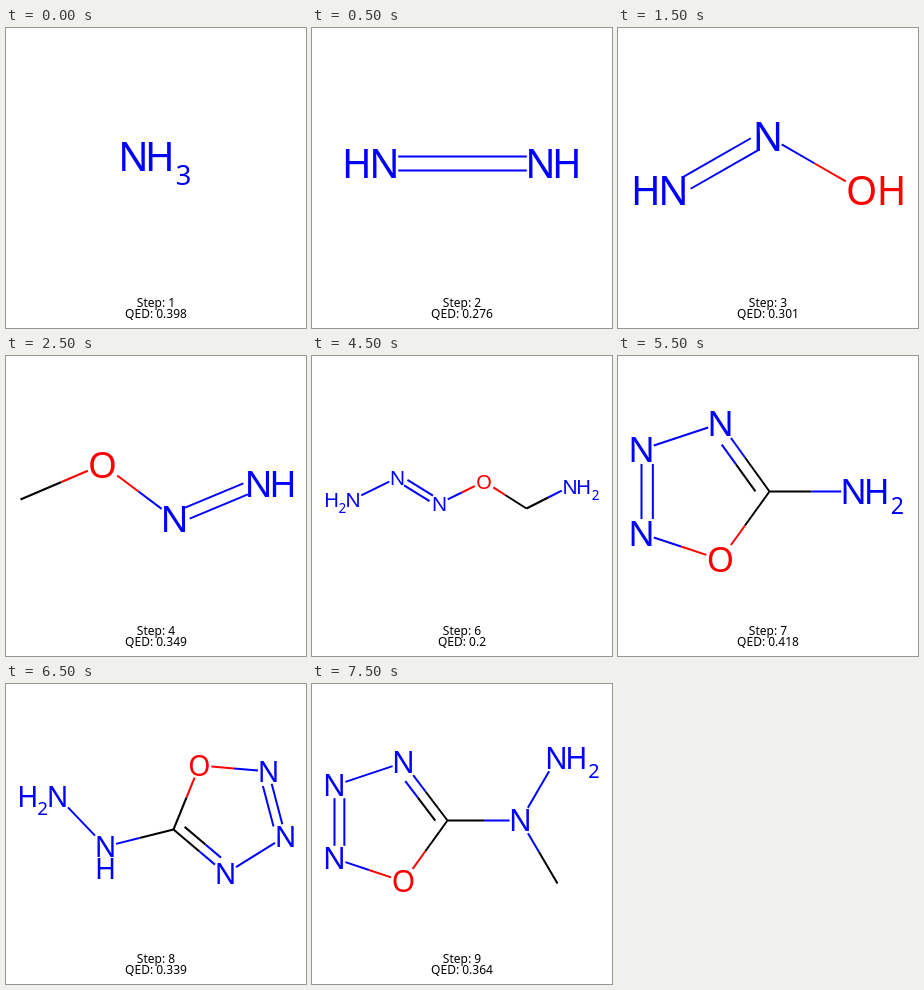
Recreate the animation shown at these times as an HTML page with a canvas. Size 300x300 px, loop 8 s.

```html
<!DOCTYPE html>
<html lang="en">
<head>
<meta charset="utf-8">
<title>Molecule steps</title>
<style>
  html, body { margin: 0; width: 100%; height: 100%; overflow: hidden; background: #fff; }
  canvas { display: block; width: 300px; height: 300px; }
</style>
</head>
<body>
<canvas id="stage" width="300" height="300"></canvas>
<script>
const ctx = document.getElementById('stage').getContext('2d');
const FONT = '"Noto Sans", "Open Sans", sans-serif';
const COLORS = { N: '#00f', O: '#f00', C: '#000' };

// Extra glyphs per label: text, x and y offset in em, relative size
const EXTRAS = {
  NH3: [['H', .66, 0, 1], ['3', 1.25, .47, .68]],
  NH2: [['H', .66, 0, 1], ['2', 1.25, .42, .66]],
  H2N: [['H', -1.04, 0, 1], ['2', -.52, .42, .66]],
  HN: [['H', -.69, 0, 1]],
  NH: [['H', .66, 0, 1]],
  OH: [['H', .75, 0, 1]],
  NvH: [['H', 0, .79, 1]]
};

// Bonds: two atom indices and a kind: - single, = double, i double inside the ring.
// In ring molecules the first five atoms form the ring.
const MOLECULES = [
  { qed: '0.398', em: 40, bonds: '', atoms: [['NH3', 127, 128]] },
  { qed: '0.276', em: 40, bonds: '01=', atoms: [['HN', 72, 135], ['NH', 228, 135]] },
  { qed: '0.301', em: 40, bonds: '01= 12-',
    atoms: [['HN', 55, 162], ['N', 149.5, 108], ['OH', 243, 162]] },
  { qed: '0.349', em: 37, bonds: '01- 12- 23=',
    atoms: [['C', 14, 143], ['O', 96, 108], ['N', 168, 162], ['NH', 252, 127]] },
  { qed: '0.232', em: 28, bonds: '01- 12- 23= 34-',
    atoms: [['C', 14, 147], ['O', 72, 114], ['N', 130, 147], ['N', 189, 114], ['NH2', 247, 147]] },
  { qed: '0.2', em: 20.5, bonds: '01- 12= 23- 34- 45-',
    atoms: [['H2N', 40.5, 143], ['N', 85, 121], ['N', 127, 147], ['O', 171.5, 125], ['C', 214, 152], ['NH2', 257.5, 130]] },
  { qed: '0.418', em: 35, bonds: '01- 12i 23- 34- 40i 45-',
    atoms: [['N', 102, 67], ['N', 23, 93], ['N', 23, 177], ['O', 102, 203], ['C', 151, 135], ['NH2', 235, 135]] },
  { qed: '0.339', em: 28.5, bonds: '01- 12i 23- 34i 40- 15- 56-',
    atoms: [['O', 193, 81], ['C', 167, 145], ['N', 219, 189], ['N', 279, 152], ['N', 262, 87], ['NvH', 99, 162], ['H2N', 51, 112]] },
  { qed: '0.364', em: 30, bonds: '01- 12i 23- 34- 40i 45- 56- 57-',
    atoms: [['N', 91, 78], ['N', 22, 101], ['N', 22, 174], ['O', 91, 197], ['C', 135, 136], ['N', 208, 136], ['NH2', 244, 74], ['C', 245, 199]] }
];

const element = ([label]) => label.match(/[NO]/)?.[0] || 'C';

function glyph(text, x, y, size) {
  ctx.font = `${size}px ${FONT}`;
  ctx.fillText(text, x, y + size * .357);
}

function line(x1, y1, x2, y2, color) {
  ctx.strokeStyle = color;
  ctx.beginPath();
  ctx.moveTo(x1, y1);
  ctx.lineTo(x2, y2);
  ctx.stroke();
}

// Distance from an atom centre at which its bond line starts
function gap(atom, ux, uy, em, inset) {
  const kind = element(atom);
  if (kind === 'C') return inset;
  const halfWidth = (kind === 'O' ? .33 : .28) * em + 2.5;
  const halfHeight = .357 * em + 2;
  return Math.min(halfWidth / Math.abs(ux), halfHeight / Math.abs(uy));
}

function drawBond(a, b, kind, { atoms, em }) {
  const [, ax, ay] = a, [, bx, by] = b;
  const length = Math.hypot(bx - ax, by - ay);
  const ux = (bx - ax) / length, uy = (by - ay) / length;
  const colorA = COLORS[element(a)], colorB = COLORS[element(b)];

  function stroke(offset, inset = 0) {
    const point = d => [ax + ux * d - uy * offset, ay + uy * d + ux * offset];
    const start = point(gap(a, ux, uy, em, inset));
    const end = point(length - gap(b, ux, uy, em, inset));
    const middle = point(length / 2);
    if (colorA === colorB) {
      line(...start, ...end, colorA);
    } else {
      line(...start, ...middle, colorA);
      line(...middle, ...end, colorB);
    }
  }

  if (kind === '=') {
    const half = Math.min(length * .065, 7);
    stroke(half);
    stroke(-half);
    return;
  }
  stroke(0);
  if (kind === 'i') {
    const mean = k => atoms.slice(0, 5).reduce((sum, atom) => sum + atom[k], 0) / 5;
    const side = Math.sign(ux * (mean(2) - ay) - uy * (mean(1) - ax));
    stroke(side * length * .135, length * .1);
  }
}

function drawAtom(atom, em) {
  const [label, x, y] = atom, kind = element(atom);
  if (kind === 'C') return;
  ctx.fillStyle = COLORS[kind];
  glyph(kind, x, y, em);
  for (const [text, dx, dy, scale] of EXTRAS[label] || []) {
    glyph(text, x + dx * em, y + dy * em, em * scale);
  }
}

function draw(step) {
  const molecule = MOLECULES[step], { atoms, bonds, em, qed } = molecule;
  ctx.fillStyle = '#fff';
  ctx.fillRect(0, 0, 300, 300);
  ctx.lineWidth = 2;
  ctx.textAlign = 'center';

  ctx.save();
  ctx.translate(.5, .5);
  for (const [i, j, kind] of bonds.split(' ').filter(Boolean)) {
    drawBond(atoms[i], atoms[j], kind, molecule);
  }
  for (const atom of atoms) drawAtom(atom, em);
  ctx.restore();

  ctx.fillStyle = '#000';
  glyph(`Step: ${step + 1}`, 150, 274.5, 12);
  glyph(`QED: ${qed}`, 150, 286, 12);
}

let shown = -1;
function tick() {
  const step = Math.floor((performance.now() % 8000 + 500) / 1000);
  if (step !== shown) draw(shown = step);
  requestAnimationFrame(tick);
}
tick();
</script>
</body>
</html>
```
